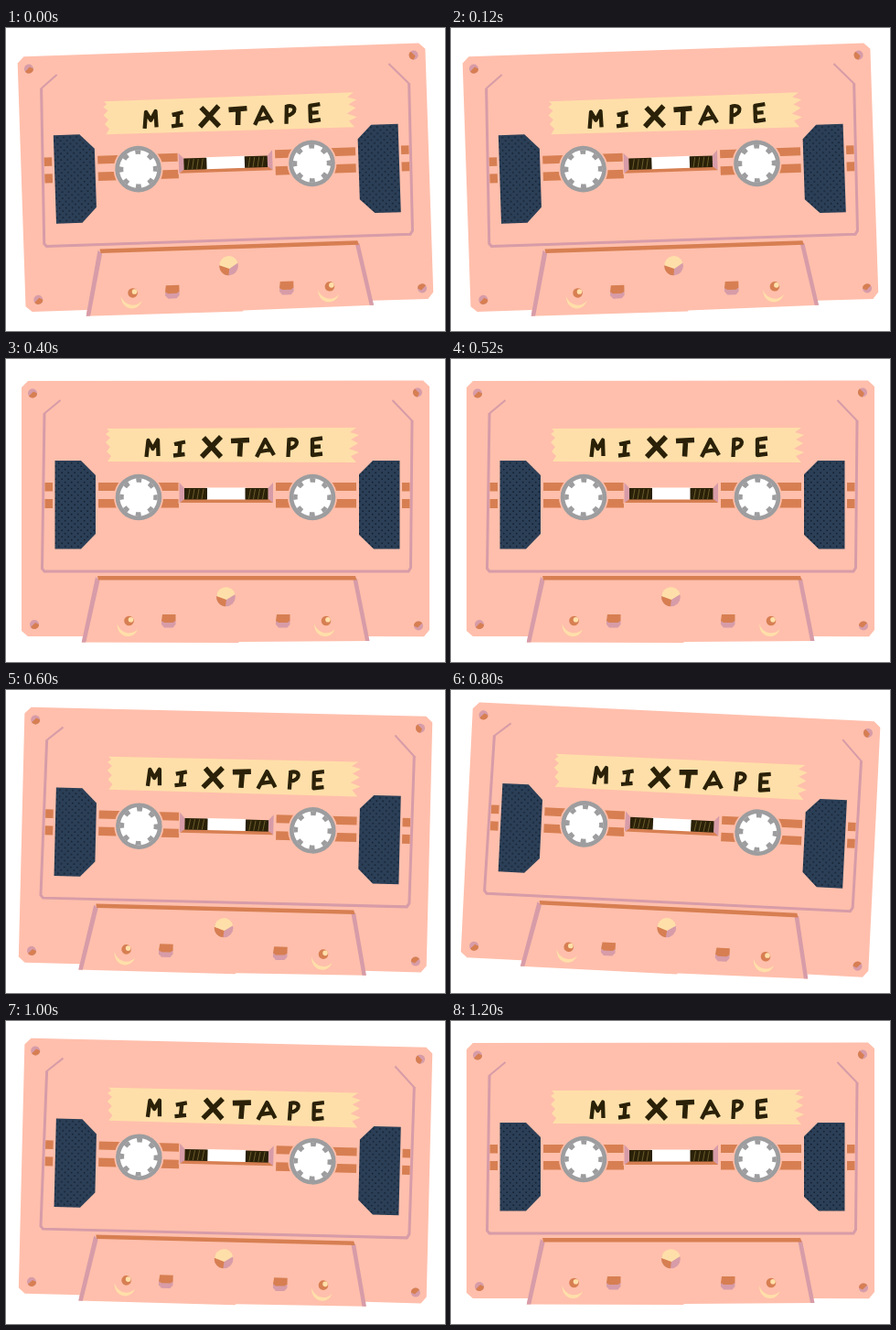
Recreate the animation shown at these times as an HTML page. Size 480 by 331 pixels, loop 1400 ms.

```html
<!DOCTYPE html>
<html lang="en">
<head>
<meta charset="utf-8">
<title>Mixtape</title>
<style>
  html, body { margin: 0; width: 100%; height: 100%; overflow: hidden; background: #fff; }
  svg { display: block; width: 100%; height: 100%; }
  .pink { fill: #ffbfac; }
  .mauve { fill: #d79ca8; }
  .orange { fill: #d77f52; }
  .cream { fill: #ffdfa9; }
  .ink { fill: #2a2108; }
  .line { fill: none; stroke: #d79ca8; stroke-width: 3; }
  .thin { stroke-width: 2; }
  .letters { fill: none; stroke: #2a2108; stroke-width: 4.3; stroke-linejoin: round; }
  .heavy { stroke-width: 5.6; }
</style>
</head>
<body>
<svg viewBox="0 0 480 331" role="img" aria-label="Cassette labelled MIXTAPE">
  <defs>
    <pattern id="dots" width="7" height="7" patternUnits="userSpaceOnUse">
      <path fill="#2b3f57" d="M0 0h7v7H0z"/>
      <g fill="#14202f"><circle cx="1.7" cy="1.7" r=".9"/><circle cx="5.2" cy="5.2" r=".9"/></g>
    </pattern>
    <g id="screw">
      <circle r="5" class="mauve"/>
      <path class="orange" d="M-4 3A5 5 0 0 0 5 0L1-2Z"/>
    </g>
    <g id="reel">
      <circle r="27" class="pink"/>
      <circle r="25.3" fill="#9d9d9f"/>
      <circle r="20.7" fill="#fff"/>
      <circle r="18.6" fill="none" stroke="#9d9d9f" stroke-width="4.6" pathLength="80" stroke-dasharray="4 6" transform="rotate(-8)"/>
    </g>
    <path id="stripes" class="orange" d="M0 135h88v9H0zM0 153h88v9.5H0z"/>
    <path id="tab" class="orange" d="M0 135h8.5v9.5H0zM0 153h8.5v10H0z"/>
    <g id="coil">
      <path class="ink" d="M0 141h25v12.5H0z"/>
      <path fill="none" stroke="#7b6a35" stroke-width=".8" d="M6 142l-2 11M11 142l-2 11M16 142l-2 11M21 142l-2 11"/>
    </g>
    <g id="peg">
      <path class="mauve" d="M0 7h15.500v4l-3 3.500H3L0 11z"/>
      <path class="orange" d="M1 0h14.500v7l-3 2H3L0 7z"/>
    </g>
    <g id="knob">
      <path class="cream" d="M-13 3C-13 20 6 21 9.500 9C4 16-9 15-13 3Z"/>
      <circle r="5.300" class="orange"/>
      <circle cx="2" cy="-1.300" r="2.800" class="cream"/>
    </g>
  </defs>

  <g id="tape">
    <path class="pink" d="M17 31L24 24L456 23.500L463 30V296L457 303.300L396 303L397 308L255 309L254 310L83 309.500L84 303L24 303L17 297Z"/>
    <use href="#screw" x="29" y="37.500"/>
    <use href="#screw" transform="translate(450 36.500) rotate(90)"/>
    <use href="#screw" x="31" y="290"/>
    <use href="#screw" transform="translate(451 291.500) rotate(180)"/>

    <path class="line" d="M42 59L39.500 229L42 232H440L442.500 228L444 67"/>
    <path class="line thin" d="M59.500 45L42 59.500M422.500 45L444 67.500"/>

    <path class="cream" d="M110 76L383 75L376 80L386 83L377 88L385 92L375 98L386 102L377 106L383 113L111 112L115 106L110 101L114 96L109 91L114 86L109 82L113 79Z"/>
    <path class="letters" d="M153.500 107L155.500 89L160.500 98L166 88.500L166.500 106
      M184 93L196 90.500M190.500 92L189.500 104M183 105.500L195.500 104
      M274 107L283.500 88L293 105M278 101L290 99
      M309.500 87L308.500 107M308 88.500C321 84 321 97 309 98
      M346 86.500L335 88L335 105L346 103.500M335 96L344 95.500"/>
    <path class="letters heavy" d="M216 86L235 107M235 85L214 107M246 89.500L266 88.500M256.500 89L255.500 106.500"/>

    <use href="#tab" x="42.500"/>
    <use href="#tab" x="433"/>
    <use href="#stripes" x="101"/>
    <use href="#stripes" x="295"/>
    <path fill="url(#dots)" d="M53.500 111H82L98 127V191L82 207.500H53.500ZM386 126L401 111H430.500V207.500H402L386 192Z"/>
    <use href="#reel" x="145" y="151"/>
    <use href="#reel" x="335" y="151"/>

    <path class="pink" d="M188.500 134H293V158H188.500z"/>
    <path class="mauve" d="M189.500 135L195 141V153.500L189.500 157ZM292 135L286.500 141V153.500L292 157Z"/>
    <path class="orange" d="M195 153H287L292 157H190Z"/>
    <path fill="#fff" d="M219 140.500H262V153.500H219z"/>
    <use href="#coil" x="195"/>
    <use href="#coil" x="261.500"/>

    <path class="mauve" d="M98 238L102.500 242L87.300 309.500H82.700ZM379.500 241L384 240L397.500 308H393Z"/>
    <path class="orange" d="M100 237H382L383.500 241.500H101Z"/>

    <circle cx="240.500" cy="260" r="10.300" class="mauve"/>
    <path class="orange" d="M241 262L230.200 259A10.300 10.300 0 0 0 240 270.300Z"/>
    <path class="cream" d="M241 263L230.200 259A10.300 10.300 0 0 1 250.500 257Z"/>

    <use href="#peg" x="170" y="279"/>
    <use href="#peg" x="295" y="279"/>
    <use href="#knob" x="134.500" y="286"/>
    <use href="#knob" x="350" y="286"/>
  </g>
</svg>
<script>
  const tape = document.getElementById('tape');
  const angles = [-1.9, -0.85, 0, 1.4, 2.8, 1.4, 0];
  const STEP = 200;

  function draw() {
    const i = Math.floor(performance.now() / STEP) % angles.length;
    tape.setAttribute('transform', `rotate(${angles[i]} 240 165)`);
    requestAnimationFrame(draw);
  }
  draw();
</script>
</body>
</html>
```
